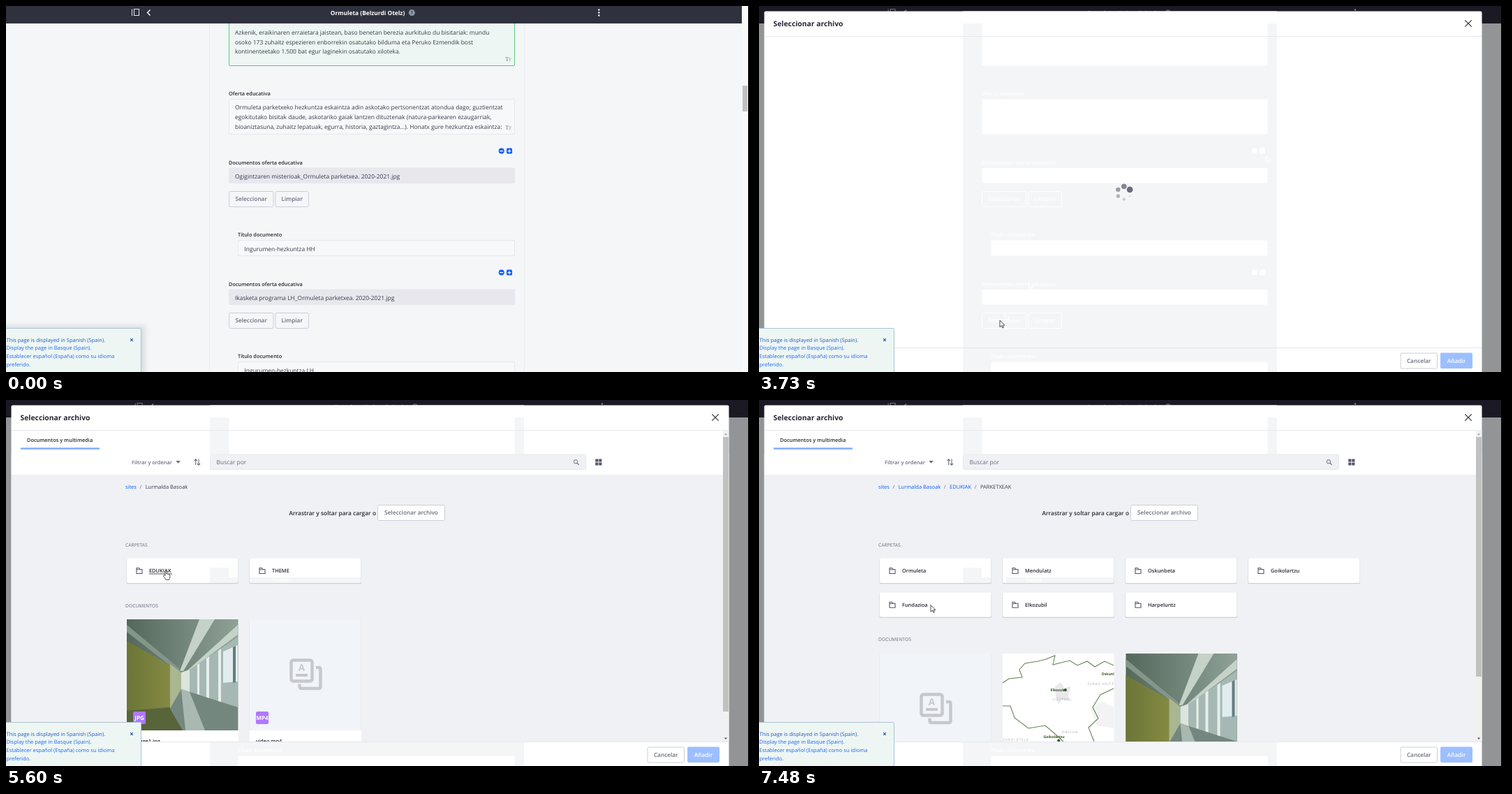
Write an HTML page that moves like this. It is 1070x524 px and loops after 8 s.

```html
<!DOCTYPE html>
<html lang="es">
<head>
<meta charset="utf-8">
<title>Seleccionar archivo</title>
<style>
html, body { margin: 0; width: 100%; height: 100%; overflow: hidden; background: #000; }
svg { display: block; }
text { font: 8.45px 'Open Sans', 'Noto Sans', sans-serif; fill: #393a4a; text-rendering: geometricPrecision; white-space: pre; }
.label { font-weight: 600; font-size: 7.4px; fill: #272833; }
.button { font-weight: 600; font-size: 8.25px; fill: #6b6c7e; }
.small { font-size: 7.5px; }
.head { font-size: 6.75px; fill: #6b6c7e; }
.folder { font-weight: 600; font-size: 7.4px; fill: #272833; }
.serif { font-family: 'Liberation Serif', serif; fill: #6f7f94; }
.place { font-weight: 700; font-size: 5.2px; fill: #33571f; }
.area { font-size: 4.6px; fill: #a6a6a6; letter-spacing: .8px; }
.muted { fill: #6b6c7e; }
.blue { fill: #0b5fff; }
.white { fill: #fff; }
.btn { fill: none; stroke: #cdced9; }
.ghost rect, .ghost text, .ghost circle { fill: #fff; stroke: none; }
.ghost .btn, .white.btn { fill: none; stroke: #fff; }
</style>
</head>
<body>
<svg id="stage" width="1070" height="524" viewBox="0 0 1070 524"></svg>
<script>
const LOOP = 8000, CLEARED = 1870, MODAL = 3730, FILES = 4360, SUB = 5920, PARKS = 7160;
const GHOST = '#f4f5f7', INK = '#6b6c7e';

const rect = (x, y, w, h, fill, more = '') => `<rect x="${x}" y="${y}" width="${w}" height="${h}" fill="${fill}" ${more}/>`;
const text = (x, y, s, cls = '', more = '') => `<text x="${x}" y="${y}" class="${cls}" ${more}>${s}</text>`;
const path = (d, fill, more = '') => `<path d="${d}" fill="${fill}" ${more}/>`;
const line = (d, color, w = 1) => path(d, 'none', `stroke="${color}" stroke-width="${w}"`);
const dot = (x, y, r, fill, more = '') => `<circle cx="${x}" cy="${y}" r="${r}" fill="${fill}" ${more}/>`;
const move = (x, y, s, more = '') => `<g transform="translate(${x} ${y})" ${more}>${s}</g>`;
const during = (from, to, s) => `<g data-t="${from},${to}">${s}</g>`;
const centered = 'text-anchor="middle"';

// Page behind the dialog
const bar =
  line('M180.5 4.5V14', '#e7e7ed') + rect(183.5, 4.5, 7, 9, 'none', 'stroke="#e7e7ed"') +
  line('M206.5 5.5L202.5 9.5 206.5 13.5', '#fff', 1.4) +
  text(518, 12.5, 'Ormuleta (Belzurdi Otelz)', 'white', `${centered} style="font-weight:700;font-size:8.4px"`) +
  dot(581.3, 9.6, 4.5, '#8b9bab') + text(581.3, 12, '?', '', `${centered} style="font-weight:700;font-size:6.5px;fill:#30313f"`) +
  [5.5, 9.5, 13.5].map(y => dot(849.3, y, 1.2, '#fff')).join('');

const field = (x, y, h, fill = '#f7f8fa', stroke = '#e7e8ee') =>
  rect(x + .5, y + .5, 728 - x, h - 1, fill, `stroke="${stroke}" rx="1.5"`);
const button = (x, y, w, s, cls = '') =>
  rect(x + .5, y + .5, w - 1, 22, 'none', `rx="2" class="btn ${cls}"`) + text(x + w / 2, y + 14.3, s, 'button ' + cls, centered);
const sizeIcon = y => text(715, y, 'T', 'serif', 'style="font-size:9px"') + text(720, y, 'T', 'serif', 'style="font-size:6.5px"');

const title = y => text(332, y + 330, 'Título documento', 'label') + field(332, y + 335, 23);
const entry = (y, file, clear, name) =>
  dot(709.7, y + 207.6, 4, '#0b5fff') + line(`M707.3 ${y + 207.6}h4.8`, '#fff', 1.3) +
  rect(717, y + 203.6, 8, 8, '#0b5fff', 'rx="1.5"') + line(`M718.6 ${y + 207.6}h4.8M721 ${y + 205.2}v4.8`, '#fff', 1.2) +
  text(319, y + 226.5, 'Documentos oferta educativa', 'label') +
  field(319, y + 231.5, 22.5, '#e7e7ed', '#e7e7ed') + file +
  button(319, y + 265, 64.5, 'Seleccionar') + clear + title(y) + name;

const clear = (y, cls) => button(385.5, y + 265, 48.5, 'Limpiar', cls);
const before = s => during(0, CLEARED, s), after = s => during(CLEARED, LOOP, s);
const level = cls => text(341.5, 524.5, 'Ingurumen-hezkuntza LH', cls);

const form =
  rect(319.5, 10.5, 409, 75, '#edf6f2', 'stroke="#5aca82" rx="1.5"') +
  text(328, 41, 'Azkenik, eraikinaren erraietara jaistean, baso benetan berezia aurkituko du bisitariak: mundu') +
  text(328, 54.5, 'osoko 173 zuhaitz espezieren enborrekin osatutako bilduma eta Peruko Ezmendik bost') +
  text(328, 68, 'kontinenteetako 1.500 bat egur laginekin osatutako xiloteka.') + sizeIcon(78.5) +
  text(319, 128.3, 'Oferta educativa', 'label') + field(319, 133, 51) +
  text(328, 148.4, 'Ormuleta parketxeko hezkuntza eskaintza adin askotako pertsonentzat atondua dago; guztientzat') +
  text(328, 162, 'egokitutako bisitak daude, askotariko gaiak lantzen dituztenak (natura-parkearen ezaugarriak,') +
  text(328, 175.5, 'bioaniztasuna, zuhaitz lepatuak, egurra, historia, gaztagintza...). Honatx gure hezkuntza eskaintza:') + sizeIcon(177) +
  entry(0, text(328, 246.5, 'Ogigintzaren misterioak_Ormuleta parketxea. 2020-2021.jpg'), clear(0),
    text(341.5, 350.5, 'Ingurumen-hezkuntza HH')) +
  entry(174, before(text(328, 420.5, 'Ikasketa programa LH_Ormuleta parketxea. 2020-2021.jpg')),
    before(clear(174)) + after(clear(174, 'white')), before(level()) + after(level('white')));

const thumb = (y, h) => rect(1055, y, 7, h, '#c1c1c1');
const page =
  rect(0, 0, 1063, 524, '#f4f6f8') + line('M291.5 25V524M742.5 25V524', '#eaecf0') +
  form + rect(0, 0, 1054, 25, '#30313f') + bar +
  rect(1054, 0, 9, 524, '#f9f9fa') +
  during(0, 1550, thumb(114, 37)) + during(1550, CLEARED, thumb(114, 38)) + after(thumb(112, 36));

// Dialog frame with the faint remains of the page
const arrowShape = 'M0 0V9.6L2.3 7.6 3.9 11 5.4 10.3 3.9 7.1H6.9Z';
const ghostArrow = (x, y) => path(arrowShape, 'none', `stroke="#fff" transform="translate(${x} ${y})"`);
const spinner = [0, 1, 2, 3, 4, 5].map(i => {
  const a = -(30 + 60 * i) * Math.PI / 180;
  return dot(522.8 + 9.7 * Math.cos(a), 267.5 + 9.3 * Math.sin(a), 4.4 - .6 * i, INK, `opacity="${1 - .17 * i}"`);
}).join('');

const dialog =
  rect(0, 0, 1063, 524, '#939496') + rect(0, 0, 1063, 25, '#1b1a24') + move(4.6, 0, bar, 'opacity=".45"') +
  rect(7.5, 7.5, 1028, 530, '#fff', 'rx="2"') + rect(292, 25, 450, 499, GHOST) +
  `<g class="ghost">${form}</g>` + rect(292, 7.5, 450, 17.5, '#fff') +
  ghostArrow(726, 214) + ghostArrow(386, 395) + ghostArrow(352, 440) +
  text(20.5, 29.3, 'Seleccionar archivo', '', 'style="font-weight:700;font-size:10.35px;fill:#272833"') +
  line('M1011.3 20.3l9.4 9.4M1020.7 20.3l-9.4 9.4', '#272833', 1.15) +
  line('M8 43.5H1035M8 489.5H1035', '#e7e7ed') +
  rect(919, 497, 53, 22, '#fff') + button(918.5, 496.5, 53.5, 'Cancelar') +
  rect(976, 496.5, 46, 22.5, '#9dbfff', 'rx="2"') + text(999, 511, 'Añadir', 'button white', centered) +
  during(MODAL, 4050, spinner) + during(4050, FILES, rect(292, 77, 450, 163, '#fff') + rect(505, 250, 35, 32, GHOST));

// File browser
const folderIcon = (x, y) => line(`M${x + .5} ${y + 8.5}v-8h3.4l1.4 2h3.2v6zM${x + .5} ${y + 2.8}h5`, '#54556b', 1.1);
const folder = (s, i) => {
  const x = 173 + 176 * (i % 4), y = 227 + 48.7 * Math.floor(i / 4);
  return rect(x - .5, y, 160.5, 36.2, '#cfd0d8', 'rx="2"') + rect(x, y - .2, 159.5, 35.2, '#fff', 'rx="2"') +
    folderIcon(x + 13.5, y + 13) + text(x + 32, y + 20.2, s, 'folder');
};
const remains = x => rect(292, 240, 27, 22, GHOST) + rect(319, 254, 13, 8, GHOST) + rect(x, 254, 508 - x, 8, GHOST) +
  text(381, 261, 'THEME', 'folder white');

const toolbar = line('M21 69.5H134', '#80acff', 2.6) + text(30, 60, 'Documentos y multimedia', 'label');
const crumb = (s, i, all) => {
  const gap = i ? 'dx="5.5"' : '';
  return i < all.length - 1 ? `<tspan class="blue" ${gap}>${s}</tspan><tspan class="muted" dx="4.5">/</tspan>` : `<tspan ${gap}>${s}</tspan>`;
};
const tools = (crumbs, folders) =>
  text(180, 91.5, 'Filtrar y ordenar', 'label muted') + path('M243.3 87h6.6l-3.3 3.8z', INK) +
  line('M271.7 93V85M269.6 87l2.1-2.2 2.1 2.2M276 84.5v8.5M273.9 91l2.1 2.2 2.1-2.2', INK, 1.1) +
  rect(292.5, 78, 538, 21.5, '#f0f1f5', 'stroke="#e7e7ed" rx="2"') + text(301.5, 92, 'Buscar por', 'muted') +
  dot(816, 88.3, 2.7, 'none', `stroke="${INK}"`) + line('M818 90.3l2.6 2.6', INK, 1.3) +
  [0, 5].map(x => [0, 5].map(y => rect(844.2 + x, 84.5 + y, 4.2, 4, '#54556b')).join('')).join('') +
  text(171, 127.4, crumbs.map(crumb).join(''), 'small') +
  text(530, 164.8, 'Arrastrar y soltar para cargar o', 'button', 'text-anchor="end" style="fill:#272833;font-size:8.4px"') +
  rect(532, 150.5, 97, 22, '#fff', 'rx="2"') + button(532, 150, 97, 'Seleccionar archivo') +
  text(171, 209.5, 'CARPETAS', 'head') + folders.map(folder).join('');

const scroller = h =>
  rect(1027, 43.5, 8.5, 446, '#f1f1f1') + rect(1027, 53, 8, h, '#c1c1c1') +
  path('M1029 50h4l-2-2.5z', '#a3a3a3') + path('M1029 483.5h4l-2 2.5z', '#505050');

const blank = (x, y) => rect(x - .5, y, 160.5, 180, '#e1e3ea') + rect(x, y, 159.5, 180, '#f1f4f8') + move(x + 57, y + 56,
  line('M38 13h3.5q3 0 3 3v24q0 3-3 3H17.5q-3 0-3-3v-3.5', '#c6c8cd', 4.5) +
  rect(2.5, 2.5, 30, 30, 'none', 'rx="3" stroke="#c6c8cd" stroke-width="4.5"') +
  text(17.5, 18, 'A', '', `${centered} style="font-weight:700;font-size:13.5px;fill:#c6c8cd"`) + rect(9, 22, 17, 4, '#c6c8cd'));
const badge = (x, s) => rect(x, 446, 18, 18, '#af78ff', 'rx="2"') +
  text(x + 9, 458.3, s, 'white', `${centered} style="font-weight:700;font-size:8px"`);
const caption = (x, s) => rect(x - .5, 473, 160.5, 20, '#fff') + text(x + 9, 490.6, s, 'folder');

const photo = (x, y) => move(x, y,
  rect(0, 0, 159.5, 159, 'url(#ceiling)') +
  path('M104 0h22L81 74h-5zM159 8V22L92 72l-6 2z', '#c5d2c8') + path('M0 8L75 70v6L0 18z', '#84968a') +
  path('M0 31L62 66v60L0 131z', 'url(#wall)') + path('M0 131L62 126 80 159H0z', '#58643a') +
  path('M62 64l16 12v25l-16 27z', '#aab690') + path('M78 76l12-4v32l-12-4z', '#dbe5de') +
  path('M90 72L159 25V126L90 104z', '#a6b8b3') + path('M138 46l21-9v52l-21 2z', '#e1ecee') +
  path('M101 65l3-2v45l-3-1zM114 56l4-3v60l-4-1zM131 45l4-3v77l-4-1z', '#e6efec') + path('M152 40l4-2v52l-4 1z', '#667d80') +
  path('M62 128L78 100 90 104 159 126v33H80z', '#74877f') +
  path('M78 100l12 4 22 55H84z', '#c0cdc6', 'opacity=".7"'));

const place = (x, y, s) => text(x, y, s, 'place'), area = (x, y, s) => text(x, y, s, 'area');
const map = rect(349, 363, 159.5, 130, '#fff') + `<g clip-path="url(#map)">` +
  path('M424 410l8-6 5 8 9-2-3 14 5 7-15-2-4 7-4-12z', '#e9e9ec') + path('M474 440l18-8 16 8v30l-24-4z', '#f3f3f5') +
  line('M349 405L358 399 377 397 373 386 381 377 400 374 411 371 424 366 421 379 445 373 456 380 470 374 481 382 495 374 508 380' +
    'M349 438L360 438 366 455 386 470 410 466 424 478 436 489M508 413L489 422 478 440 486 456 472 469 480 489', '#64845a', 1.1) +
  place(417.5, 417, 'Elkozubil') + dot(438.8, 415.3, 2, '#33571f') + area(420.5, 430, 'LIZOPEA') +
  place(490.5, 394, 'Oskunbeta') + area(470.5, 408, 'ZURKO HAITZA') + area(434, 477, 'OBELUN') +
  place(407.5, 484, 'Goikolartzu') + dot(429.3, 487.5, 2, '#33571f') + area(346, 487.5, 'LZURDI OTELZ') + '</g>';

const site = 'Lurmalda Basoak';
const mainView = tools(['sites', site], ['EDUKIAK', 'THEME']) + remains(349) +
  text(171, 296.5, 'DOCUMENTOS', 'head') + photo(173, 314) + blank(349, 314) +
  caption(173, 'image1.jpg') + caption(349, 'video.mp4') + badge(182, 'JPG') + badge(358, 'MP4') +
  scroller(393) + during(5290, SUB, line('M205 248.9H238', '#272833', .8));
const subView = move(5, 0, tools(['sites', site, 'EDUKIAK'],
    ['AGENDA', 'AKTUALITATEA', 'HASIERA', 'INFORMAZIOA', 'PARKETXEAK', 'SENDEROS', 'SOBRE NOSOTROS'])) + remains(354) +
  text(182, 345.2, '20 entradas', 'small') + path('M226 342h4l-2-2.5zM226 343.5h4l-2 2.5z', '#393a4a') +
  text(244.5, 345.2, 'Mostrando el intervalo 1 - 7 de 7 resultados.', 'small muted') +
  rect(836, 337, 15.5, 10.5, '#e4e5ea', 'rx="1.5"') + text(843.7, 345.2, '1', 'small', centered) +
  path('M830 339.5v5.6l-3.2-2.8z', '#54556b') + path('M857.5 339.5v5.6l3.2-2.8z', '#54556b') +
  during(6520, PARKS, line('M210 297.5H257', '#272833', .8));
const parkView = tools(['sites', site, 'EDUKIAK', 'PARKETXEAK'],
    ['Ormuleta', 'Mendulatz', 'Oskunbeta', 'Goikolartzu', 'Fundazioa', 'Elkozubil', 'Harpeluntz']) + remains(354) +
  text(171, 345.2, 'DOCUMENTOS', 'head') + blank(173, 363) + map + photo(525.5, 363) + scroller(343);

const browser = '<g clip-path="url(#body)">' +
  rect(7.5, 77, 1028, 30, '#fff') + rect(7.5, 107, 1028, 382, '#f0f1f5') + toolbar +
  during(FILES, SUB, mainView) + during(SUB, PARKS, subView) + during(PARKS, LOOP, parkView) + '</g>';

// Language notice
const shadow = rect(-20, 457, 220, 90, INK, 'opacity=".16" filter="url(#soft)"');
const notice =
  rect(-2, 461.5, 195.5, 70, '#edf6f3', 'stroke="#a9c4d0" rx="1"') +
  text(.5, 480.5, 'This page is displayed in Spanish (Spain).', 'small', 'style="fill:#2458c4"') +
  ['Display the page in Basque (Spain).', 'Establecer español (España) como su idioma', 'preferido.']
    .map((s, i) => text(.5, 492.4 + 11.8 * i, s, 'small', 'style="fill:#1f66f5"')).join('') +
  line('M178.2 476.2l3.6 3.6M181.8 476.2l-3.6 3.6', '#1d4fae', 1.1);

// Pointer: start time, x, y, shape
const outline = 'stroke="#222" stroke-width=".8" stroke-linejoin="round"';
const shapes = {
  arrow: path(arrowShape, '#fff', outline),
  hand: path('M3 8V1.5q1-1.5 2 0V5.5q1.2-.8 1.7.4 1.2-.6 1.6.5 1.5-.4 1.5 1V10q0 2-1.2 3.8H4.2Q3 11.5 .6 9.2 0 7.6 1.5 7.4z', '#fff', outline),
  beam: line('M0 .5H5M2.5 .5V9.5M0 9.5H5', '#333', .9),
  none: ''
};
const pointer = [
  [300, 780, 239, 'arrow'], [620, 726, 214, 'arrow'], [940, 717, 203, 'hand'], [2480, 385, 394, 'hand'],
  [2800, 369, 409, 'beam'], [3110, 352, 439, 'arrow'], [3430, 341, 449, 'hand'], [MODAL, 345, 450, 'arrow'],
  [FILES, 332, 394, 'arrow'], [4680, 234, 267, 'arrow'], [4990, 226, 250, 'arrow'], [5290, 215, 237, 'hand'],
  [5600, 225, 243.5, 'hand'], [SUB, 421, 254, 'arrow'], [6220, 290, 277, 'arrow'], [6520, 248, 291, 'hand'],
  [6840, 245.5, 291, 'hand'], [PARKS, 0, 0, 'none'], [7480, 246, 293.5, 'arrow']
].map(([t, x, y, kind], i, all) => during(t, (all[i + 1] || [LOOP])[0], move(x, y, shapes[kind]))).join('');

const gradient = (id, a, b) => `<linearGradient id="${id}"><stop stop-color="${a}"/><stop offset="1" stop-color="${b}"/></linearGradient>`;
const stage = document.getElementById('stage');
stage.innerHTML = `<defs>
  <filter id="soft"><feGaussianBlur stdDeviation="3"/></filter>
  <clipPath id="body">${rect(7.5, 43, 1028, 446, '#000')}</clipPath>
  <clipPath id="map">${rect(349, 363, 159.5, 126, '#000')}</clipPath>
  ${gradient('ceiling', '#54685b', '#8fa198')}${gradient('wall', '#6c7538', '#848a42')}</defs>` +
  during(0, MODAL, page + shadow + during(620, MODAL, ghostArrow(780, 239)) + during(940, MODAL, ghostArrow(726, 214))) +
  during(MODAL, LOOP, dialog) + during(FILES, LOOP, browser) +
  notice + pointer + rect(1063, 0, 7, 524, '#000');

const timed = [...stage.querySelectorAll('[data-t]')].map(el => [el, ...el.dataset.t.split(',').map(Number)]);
const start = performance.now();
function draw() {
  const t = (performance.now() - start) % LOOP;
  for (const [el, from, to] of timed) el.style.display = t >= from && t < to ? '' : 'none';
  requestAnimationFrame(draw);
}
draw();
</script>
</body>
</html>
```
